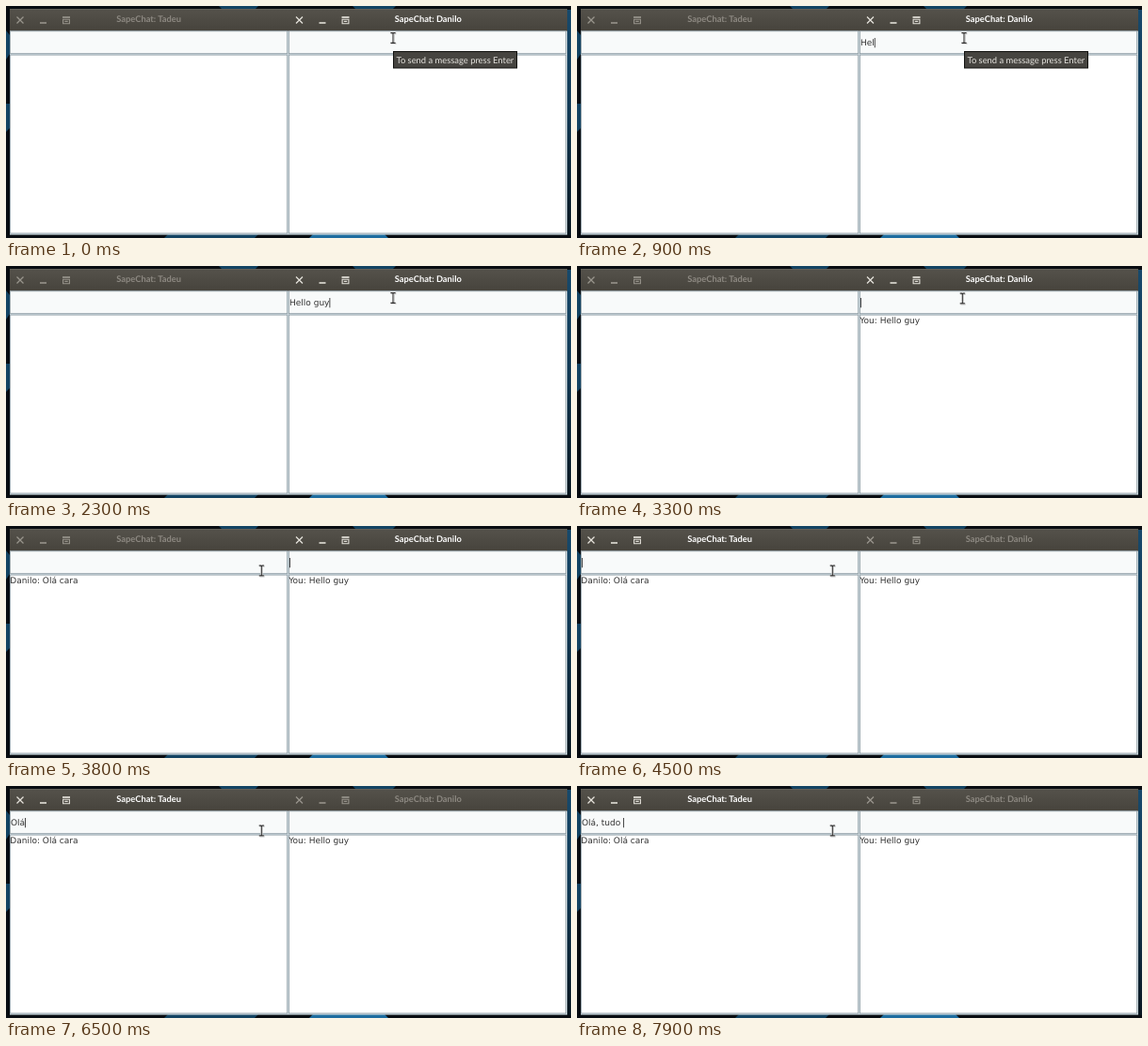
Write an HTML page that moves like this. It is 600x247 px and loops after 8 s.

```html
<!DOCTYPE html>
<html lang="en">
<head>
<meta charset="utf-8">
<title>Two chat windows</title>
<style>
html, body { margin: 0; width: 100%; height: 100%; overflow: hidden; background: #080c11; }
svg { display: block; width: 100%; height: 100%; }
text { white-space: pre; text-rendering: geometricPrecision; }
.title { font: bold 9.3px Lato, sans-serif; text-anchor: middle; }
.body { font: 9px "DejaVu Sans", sans-serif; fill: #333; }
.hint { font: 9.4px Lato, sans-serif; fill: #e6e4df; }
</style>
</head>
<body>
<svg id="stage" viewBox="0 0 600 247" preserveAspectRatio="none">
  <defs>
    <linearGradient id="bar" x2="0" y2="1">
      <stop offset="0" stop-color="#55524b"/>
      <stop offset="1" stop-color="#46433c"/>
    </linearGradient>
    <linearGradient id="edge" x2="0" y2="1">
      <stop offset="0" stop-color="#17496b"/>
      <stop offset=".45" stop-color="#123a55"/>
      <stop offset="1" stop-color="#0a1720"/>
    </linearGradient>
  </defs>
  <rect width="600" height="247" fill="#080c11"/>
  <rect x="596" y="4" width="4" height="240" fill="url(#edge)"/>
  <path d="M226 0h42l-4 4h-34zM368 0h46l-4 4h-38zM0 26l4 5v20l-4 6zM0 104h4v26l-4 4zM172 243h96l-4 4h-96z" fill="#134362"/>
  <path d="M326 243h76l4 4h-84z" fill="#1d6c9f"/>
</svg>
<script>
const LOOP = 8000;
const stage = document.getElementById('stage');
const ruler = document.createElement('canvas').getContext('2d');

function add(tag, attrs, parent = stage, text = '') {
  const el = document.createElementNS('http://www.w3.org/2000/svg', tag);
  for (const key in attrs) el.setAttribute(key, attrs[key]);
  el.textContent = text;
  parent.append(el);
  return el;
}

const rect = (x, y, width, height, fill, parent) => add('rect', { x, y, width, height, fill }, parent);
const show = (el, on) => el.setAttribute('visibility', on ? 'visible' : 'hidden');

function textWidth(s) {
  ruler.font = '90px "DejaVu Sans", sans-serif';
  return ruler.measureText(s).width / 10;
}

function panel(x, y, width, height, fill, parent) {
  add('rect', { x, y, width, height, fill, stroke: '#8b9aa2', 'stroke-width': 0.8 }, parent);
}

function makeWindow(x, iconX, name, titleX, message) {
  const g = add('g', {});
  rect(x, 3, 296, 24, 'url(#bar)', g);
  rect(x, 3, 296, 0.7, '#69665f', g);
  rect(x, 26.6, 296, 217, '#d0dce2', g);
  panel(x + 0.4, 26.8, 294.3, 23.9, '#f8fafa', g);
  panel(x + 0.4, 52.1, 294.3, 189.9, '#fff', g);

  const icons = add('g', { fill: 'none', 'stroke-width': 1.3 }, g);
  add('path', { d: `M${iconX - 3.5} 11.5l7 7m0 -7l-7 7` }, icons);
  add('path', { d: `M${iconX + 21} 18h7`, 'stroke-width': 1.6 }, icons);
  add('path', { d: `M${iconX + 45} 12h8`, 'stroke-width': 1.7 }, icons);
  add('path', { d: `M${iconX + 45.6} 14.2h6.8v4.6h-6.8zM${iconX + 47.3} 16.4h3.4`, 'stroke-width': 1.1 }, icons);

  const textX = x + 1;
  return {
    icons, textX,
    title: add('text', { class: 'title', x: titleX, y: 17.3 }, g, 'SapeChat: ' + name),
    field: add('text', { class: 'body', x: textX, y: 42 }, g),
    caret: rect(textX, 34, 0.9, 10.3, '#333', g),
    message: add('text', { class: 'body', x: textX - 0.7, y: 61 }, g, message)
  };
}

const left = makeWindow(4, 15, 'Tadeu', 151.6, 'Danilo: Olá cara');
const right = makeWindow(300, 311.5, 'Danilo', 448.3, 'You: Hello guy');

const hint = add('g', {});
add('rect', { x: 411.5, y: 48.5, width: 131, height: 17.5, fill: '#464440', stroke: '#11110f' }, hint);
add('text', { class: 'hint', x: 414.5, y: 60.6 }, hint, 'To send a message press Enter');

const pointer = add('g', { fill: 'none' });
const beam = 'M-2.6 -5.4h1.9l.7 .6l.7 -.6h1.9M0 -4.8v9.6M-2.6 5.4h1.9l.7 -.6l.7 .6h1.9';
add('path', { d: beam, stroke: '#8a8a8a', 'stroke-opacity': 0.5, 'stroke-width': 2, transform: 'translate(.7 .6)' }, pointer);
add('path', { d: beam, stroke: '#fff', 'stroke-width': 2 }, pointer);
add('path', { d: beam, stroke: '#2b2b2b', 'stroke-width': 1.1 }, pointer);

// [time, text in the field]
const rightTyping = [[0, ''], [500, 'H'], [700, 'He'], [900, 'Hel'], [1100, 'Hell'], [1500, 'Hello'],
  [1800, 'Hello '], [2100, 'Hello g'], [2200, 'Hello gu'], [2300, 'Hello guy'], [2800, '']];
const leftTyping = [[0, ''], [6000, 'O'], [6200, 'Ol'], [6500, 'Olá'], [6800, 'Olá,'],
  [7000, 'Olá, '], [7300, 'Olá, tu'], [7500, 'Olá, tudo'], [7900, 'Olá, tudo ']];

function typed(steps, t) {
  let now = '';
  for (const [at, text] of steps) if (t >= at) now = text;
  return now;
}

function updateWindow(win, text, focused, caretOn) {
  win.title.setAttribute('fill', focused ? '#fff' : '#8d8982');
  win.icons.setAttribute('stroke', focused ? '#e4e1da' : '#98948c');
  win.field.textContent = text;
  win.caret.setAttribute('x', win.textX + textWidth(text));
  show(win.caret, caretOn);
}

function pointerAt(t) {
  if (t < 3300) return [411, 34];
  const k = Math.min(1, (Math.floor(t / 100) * 100 - 3300) / 500);
  const e = k * k * (3 - 2 * k);
  return [409.3 - 138 * e, 34.5 + 13 * e];
}

function draw(t) {
  const onLeft = t >= 4400;
  updateWindow(right, typed(rightTyping, t), !onLeft, t >= 300 && !onLeft);
  updateWindow(left, typed(leftTyping, t), onLeft, t >= 4500 && !(t >= 5000 && t < 5500));
  show(right.message, t >= 2900);
  show(left.message, t >= 3500);
  show(hint, t < 2300);
  pointer.setAttribute('transform', `translate(${pointerAt(t)})`);
}

const start = performance.now();
function tick() {
  draw((performance.now() - start) % LOOP);
  requestAnimationFrame(tick);
}
tick();
</script>
</body>
</html>
```
